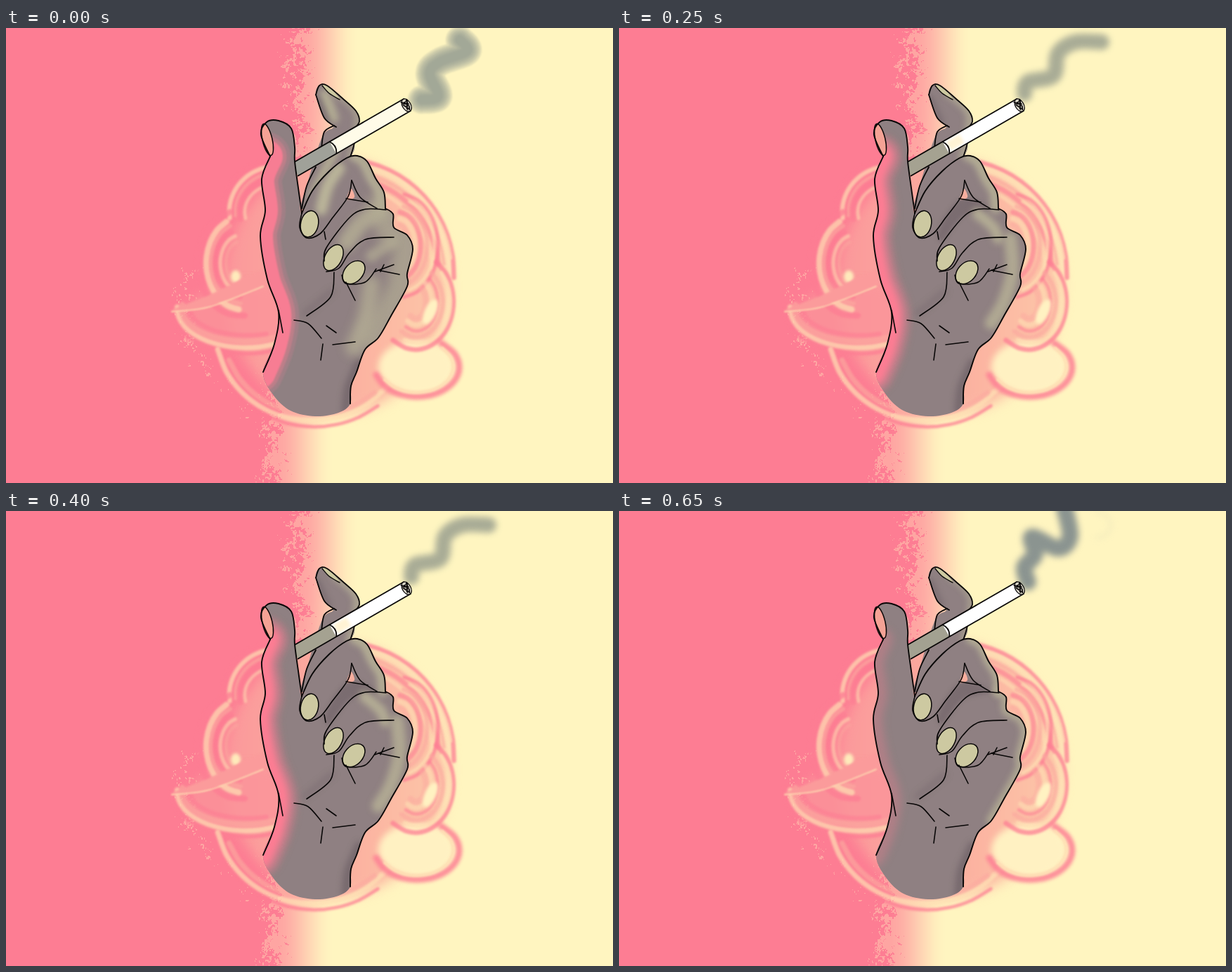
Animation, 864 px wide and 648 px high, one loop 0.75 s. Source, as an HTML page with a canvas:

```html
<!DOCTYPE html>
<html lang="en">
<head>
<meta charset="utf-8">
<title>Smoke</title>
<style>
  html, body { margin: 0; width: 100%; height: 100%; overflow: hidden; background: #fd7d93; }
  canvas, svg { position: absolute; left: 0; top: 0; width: 864px; height: 648px; }
</style>
</head>
<body>
<canvas id="paper" width="864" height="648"></canvas>
<svg viewBox="0 0 864 648" fill="none" stroke-linecap="round" stroke-linejoin="round">
  <defs>
    <linearGradient id="discTone" gradientUnits="userSpaceOnUse" x1="280" y1="0" x2="640" y2="0">
      <stop offset="0" stop-color="#fb949a"/>
      <stop offset=".5" stop-color="#fbac9e"/>
      <stop offset="1" stop-color="#fdc9a9"/>
    </linearGradient>
    <clipPath id="handClip"></clipPath>
    <clipPath id="backClip"></clipPath>
  </defs>
  <g id="swirl"></g>
  <g id="smoke"></g>
  <g id="back"></g>
  <g id="cigarette"></g>
  <g id="hand"></g>
</svg>
<script>
const W = 864, H = 648, STEP = 250, POSES = 3;
const PINK = '#fd7d93', PEACH = '#fba99f', CREAM = '#fee0b4', GREY = '#8f8082',
      DARK = '#6d5f65', OLIVE = '#b3ac94', NAIL = '#cdc9a1', INK = '#080606';
const $ = id => document.getElementById(id);

// ---------- paper: two colours meeting in a speckled seam ----------
const hash = (x, y) => {
  let n = Math.imul(x, 374761393) + Math.imul(y, 668265263);
  n = Math.imul(n ^ (n >>> 13), 1274126177);
  return ((n ^ (n >>> 16)) >>> 0) / 4294967296;
};
const mix = (a, b, t) => a + (b - a) * t;
const ease = t => (t = Math.min(1, Math.max(0, t)), t * t * (3 - 2 * t));

function noise(x, y, cell) {
  const i = Math.floor(x / cell), j = Math.floor(y / cell);
  const u = ease(x / cell - i), v = ease(y / cell - j);
  return mix(mix(hash(i, j), hash(i + 1, j), u), mix(hash(i, j + 1), hash(i + 1, j + 1), u), v);
}

function paintPaper() {
  const ctx = $('paper').getContext('2d'), img = ctx.createImageData(W, H);
  const left = [253, 125, 147], right = [255, 245, 192];
  for (let y = 0; y < H; y++) {
    const seam = -36 * ease((y - 100) / 420);
    for (let x = 0; x < W; x++) {
      const px = x - seam, k = (y * W + x) * 4;
      // faint dust rings the lower left of the swirl
      const ring = Math.hypot((x - 440) / 185, (y - 400) / 160) - 1;
      const dust = x < 400 && y > 340 ? .34 * Math.exp(-ring * ring * 40) : 0;
      const fill = Math.max(dust, .16 + .62 * (px - 384) / 58);
      const grain = .35 * noise(x, y, 1.7) + .4 * noise(x + 90, y + 40, 5) + .25 * noise(x, y, 16);
      const body = ease((px - 418) / 85);
      const tone = grain < fill ? mix(.33, 1, body) : body * .8;
      for (let c = 0; c < 3; c++) img.data[k + c] = mix(left[c], right[c], tone);
      img.data[k + 3] = 255;
    }
  }
  ctx.putImageData(img, 0, 0);
}

// ---------- drawing helpers ----------
function add(parent, tag, attrs) {
  const el = document.createElementNS('http://www.w3.org/2000/svg', tag);
  for (const key in attrs) el.setAttribute(key, attrs[key]);
  return parent.appendChild(el);
}

// Smooth curve through "x,y x,y ..."
function curve(text, closed) {
  const p = text.split(' ').map(s => s.split(',').map(Number)), n = p.length;
  const at = i => closed ? p[(i + n) % n] : p[Math.min(n - 1, Math.max(0, i))];
  let d = 'M' + p[0];
  for (let i = 0; i < (closed ? n : n - 1); i++) {
    const [a, b, c, e] = [at(i - 1), at(i), at(i + 1), at(i + 2)];
    d += 'C' + [0, 1].map(k => b[k] + (c[k] - a[k]) / 6) + ',' + [0, 1].map(k => c[k] - (e[k] - b[k]) / 6) + ',' + c;
  }
  return d + (closed ? 'Z' : '');
}
const soft = r => r ? `filter:blur(${r}px)` : '';
const line = (g, pts, color = INK, width = 1.8, blur = 0, opacity = 1, dx = 0) =>
  add(g, 'path', { d: curve(pts), stroke: color, 'stroke-width': width, style: soft(blur), opacity, transform: `translate(${dx} 0)` });
const shape = (g, pts, fill, blur = 0, opacity = 1) =>
  add(g, 'path', { d: curve(pts, true), fill, style: soft(blur), opacity });
const oval = (g, cx, cy, rx, ry, turn, attrs) =>
  add(g, 'ellipse', { cx, cy, rx, ry, transform: `rotate(${turn} ${cx} ${cy})`, ...attrs });
const poses = (g, attrs = {}) =>
  Array.from({ length: POSES }, (_, i) => add(g, 'g', { ...attrs, class: 'pose' + i }));

function arc(cx, cy, rx, ry, from, to) {
  return Array.from({ length: 9 }, (_, i) => {
    const a = mix(from, to, i / 8) * Math.PI / 180;
    return [cx + rx * Math.cos(a), cy + ry * Math.sin(a)].map(v => v.toFixed(1)).join();
  }).join(' ');
}

// ---------- swirl: bundles of nested arcs ----------
function drawSwirl() {
  const g = $('swirl'), tones = [PINK, CREAM, PEACH];
  oval(g, 470, 368, 160, 180, 0, { fill: 'url(#discTone)', style: soft(9) });
  oval(g, 345, 410, 88, 48, 0, { fill: '#fb949a', style: soft(8), opacity: .8 });
  oval(g, 584, 483, 54, 38, 0, { fill: '#fff1c2', style: soft(5) });

  // cx, cy, rx, ry, from, to, strands
  const bundles = [
    [480, 350, 160, 163, -80, -5, 5],
    [385, 262, 76, 74, 170, 262, 5],
    [335, 335, 60, 75, 90, 250, 6],
    [560, 310, 56, 74, -80, 80, 6],
    [585, 390, 54, 68, -50, 120, 6],
    [342, 400, 106, 64, 65, 182, 4],
    [437, 430, 145, 138, 45, 162, 3]
  ];
  bundles.forEach(([cx, cy, rx, ry, from, to, count], b) => {
    for (let i = 0; i < count; i++) {
      const sway = 14 * (hash(b, i) - .5), inset = i * 8;
      line(g, arc(cx + sway / 3, cy, rx - inset, ry - inset * 1.1, from + sway, to - sway),
        tones[i % 3], 4 + 5 * hash(i, b + 9), 1.6, .75 - i * .05);
    }
  });
  line(g, arc(585, 483, 60, 42, -55, 165), PINK, 9, 2.5, .85);
  line(g, arc(584, 482, 52, 37, -45, 150), CREAM, 4, 1.5);
  oval(g, 604, 404, 8, 19, 25, { fill: '#fff2c2', style: soft(2) });
  oval(g, 327, 354, 7, 9, 0, { fill: '#feeabb', style: soft(2) });

  shape(g, '235,403 290,380 366,345 366,367 290,396', '#fb9b9b', 1.5);
  line(g, '236,404 290,397 366,368', CREAM, 2, 1, .8);
}

// ---------- smoke ----------
function drawSmoke() {
  const [a, b, c] = poses($('smoke'));
  for (let i = 0; i < 5; i++)
    line(a, '592,102 615,97 603,65 618,48 656,33 646,17', '#86908c', 40 - i * 6.5, 1, .24);
  line(b, '577,94 582,77 618,68 625,36 650,20 687,20', '#a5a994', 22, 5, .95);
  line(c, '582,101 577,80 592,62 588,37 625,53 642,36 634,-5', '#8b9490', 24, 5);
  line(c, arc(680, 20, 20, 18, -90, 90), '#e9e3bb', 6, 4, .4);
}

// ---------- finger behind the cigarette ----------
function drawBack() {
  const g = $('back'), shade = { 'clip-path': 'url(#backClip)' };
  const tip = '441,95 446,82 457,82 481,102 498,118 503,133 495,146 496,163 490,184';
  const outline = tip + ' 440,245 420,256 430,218 450,155 466,141 453,128';
  add($('backClip'), 'path', { d: curve(outline, true) });
  shape(g, outline, GREY);
  const [a, b, c] = poses(g, shade);
  line(a, '454,95 466,128', OLIVE, 15, 5);
  line(a, '468,175 436,240', OLIVE, 12, 5);
  for (const [p, width] of [[a, 8], [b, 13], [c, 7]]) line(p, '470,92 500,124 490,184', OLIVE, width, 4, .8);
  line(add(g, 'g', shade), '443,100 458,134', DARK, 8, 4, .6);
  shape(g, '451,82 459,83 475,101 460,93', NAIL);
  line(g, '450,82 460,93 475,102', INK, 1.4);
  line(g, tip);
  line(g, '441,95 453,128 470,141');
  line(g, '467,139 453,148 449,171');
  line(g, '441,198 428,225 421,257');
}

// ---------- cigarette: drawn from its tip backwards ----------
function drawCigarette() {
  const g = add($('cigarette'), 'g', { transform: 'translate(571 109.5) rotate(-30)' });
  const body = { y: -9.8, height: 19.6 }, filters = ['#a0a199', '#a5a291', '#a3a191'];
  poses(g).forEach((p, i) => {
    add(p, 'rect', { ...body, x: -185, width: 63, fill: filters[i] });
    add(p, 'rect', { ...body, x: -122, width: 122, fill: i ? '#fff' : '#fffbe8' });
    if (i === 1) add(p, 'rect', { x: -118, y: -7, width: 22, height: 14, fill: '#fff3d5', style: soft(2) });
  });
  add(g, 'path', { d: 'M-185-9.8H0M-185 9.8H0M-122-9.8Q-115 0-122 9.8', stroke: INK, 'stroke-width': 1.8 });
  const ember = { stroke: INK, 'stroke-width': 1.3 };
  oval(g, -1, 0, 6, 9.8, 0, { ...ember, fill: '#d8d5c8' });
  const scribble = Array.from({ length: 14 }, (_, i) =>
    `${(5 * Math.sin(i * 2.3) - 1).toFixed(1)},${(8 * Math.cos(i * 1.7)).toFixed(1)}`);
  add(g, 'path', { ...ember, d: 'M' + scribble.join('L'), 'stroke-width': 1 });
}

// ---------- hand ----------
const thumb = '376,183 363,152 371,134 388,132 406,143 411,170 411,190 417,235 421,264';
const leftEdge = '376,183 364,215 369,260 362,297 372,358 388,405 382,450 366,490';
const middleLeft = '421,264 436,232 460,204 485,185 500,182';
const middleRight = '500,182 514,190 526,214 538,234 540,257';
const side = '540,257 551,265 552,284 571,295 579,315 571,350 571,368 548,410 530,441';
const wrist = '530,441 511,458 499,490 491,510 490,535';
const reverse = pts => pts.split(' ').reverse().join(' ');
// Chain paths that share their end points
const chain = (...parts) => parts.map((p, i) => i ? p.slice(p.indexOf(' ') + 1) : p).join(' ');

function drawShading(g) {
  const clip = { 'clip-path': 'url(#handClip)' };
  const dark = add(g, 'g', clip);
  line(dark, '503,477 488,512 484,545', DARK, 13, 4, .7);
  line(dark, '425,407 464,375', DARK, 8, 5, .4);

  const [a, b, c] = poses(g, clip);
  const bands = ['#a17f86', '#bd7f89', '#f77d93'];
  bands.forEach((color, i) => line(a, leftEdge, color, 70 - i * 11, 1, 1, -6));
  for (let i = 0; i < 4; i++)
    line(b, leftEdge, i < 3 ? '#c87f8c' : PINK, 66 - i * 9, 5, .4 + i * .2, -6);
  line(c, leftEdge, '#c57f8a', 34, 6, .6, -4);

  for (const p of [b, c])
    shape(p, '488,243 527,257 490,268 460,304 456,285', DARK, 3, .6);

  line(a, side, OLIVE, 52, 8, .7);
  line(a, '520,365 513,410 495,455', OLIVE, 24, 7, .8);
  line(a, '474,200 458,225 449,258', '#bab499', 17, 5);
  line(a, '530,263 505,278 485,305', OLIVE, 24, 6, .85);
  line(a, '550,305 520,325', OLIVE, 16, 5, .7);
  line(b, '510,264 533,284 540,300', OLIVE, 15, 5);
  line(b, '557,300 560,345 548,390 530,420', OLIVE, 19, 5, .9);
  for (const [p, width, dx] of [[a, 14, -6], [b, 14, -4], [c, 13, 0]])
    line(p, middleRight, OLIVE, width, 4, 1, dx);
  line(c, side, OLIVE, 14, 4, .9);
}

function drawHand() {
  const g = $('hand');
  const palm = chain(thumb, middleLeft, middleRight, side, wrist) + ' 473,548 440,553 405,545 380,522 '
    + reverse(leftEdge).replace(' 376,183', '');
  add($('handClip'), 'path', { d: curve(palm, true) });
  shape(g, palm, GREY);
  drawShading(g);
  shape(g, '491,229 496,241 485,244', '#f8ae9e');

  const edge = { stroke: INK, 'stroke-width': 1.5 };
  oval(g, 372, 159, 7, 23, -13, { ...edge, fill: '#f5a295' });
  oval(g, 432, 279, 12.5, 19, 12, { ...edge, fill: NAIL });
  oval(g, 466, 327, 12, 20, 28, { ...edge, fill: NAIL });
  oval(g, 495, 348, 13, 19, 42, { ...edge, fill: NAIL });

  for (const pts of [thumb, leftEdge, chain(middleLeft, middleRight), chain(side, wrist)]) line(g, pts, INK, 1.9);
  const creases = [
    '421,264 418,284 428,299 447,293 465,270 487,240 492,217',
    '492,217 504,241 528,257',
    '484,243 515,248',
    '453,290 455,301',
    '453,332 456,313 489,270 512,258 541,259',
    '456,347 474,342 489,320 512,301 552,298',
    '478,352 484,364 511,362 527,343',
    '525,347 552,337',
    '530,345 560,351',
    '538,337 533,347',
    '467,348 462,383 428,410',
    '410,416 430,421 449,442',
    '456,424 470,434',
    '465,451 497,447',
    '451,450 448,473',
    '484,362 497,388',
    '388,402 394,434'
  ];
  for (const pts of creases) line(g, pts, INK, 1.6);
}

paintPaper();
drawSwirl();
drawSmoke();
drawBack();
drawCigarette();
drawHand();

const groups = Array.from({ length: POSES }, (_, i) => document.querySelectorAll('.pose' + i));
const start = performance.now();
function tick() {
  const now = Math.floor((performance.now() - start) / STEP) % POSES;
  groups.forEach((set, i) => set.forEach(el => el.style.display = i === now ? '' : 'none'));
  requestAnimationFrame(tick);
}
tick();
</script>
</body>
</html>
```
